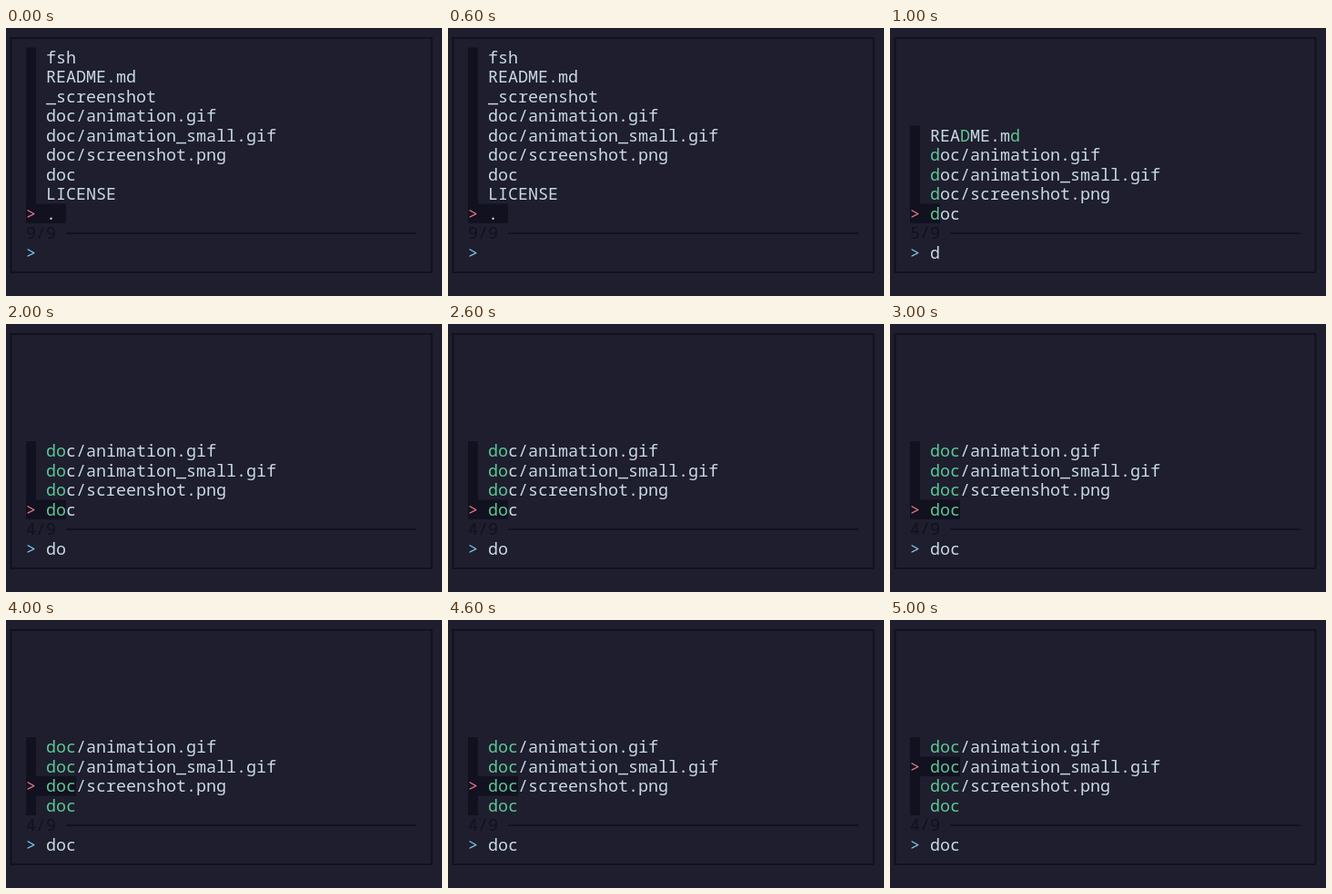
Recreate the animation shown at these times as an HTML page. Size 479 by 295 pixels, loop 6 s.

```html
<!DOCTYPE html>
<html lang="en">
<head>
<meta charset="utf-8">
<title>Fuzzy finder</title>
<style>
  html, body { margin: 0; width: 100%; height: 100%; overflow: hidden; background: #1e1e2e; }
  svg { display: block; width: 479px; height: 295px; }
  text { font: 18.333px "Noto Sans Mono", monospace; fill: #c9d9e3; white-space: pre; }
  .dark { fill: #121120; }
  .match { fill: #5cc794; }
  .pointer { fill: #e8798a; }
  .prompt { fill: #82c6ea; }
  .line { fill: none; stroke: #121120; stroke-width: 2; }
</style>
</head>
<body>
<svg id="stage" viewBox="0 0 479 295"></svg>
<script>
const CELL = 11, ROW = 21.5, BASELINE = 17, LAST_ROW = 9, STEP = 1000;
const stage = document.getElementById('stage');

const docs = ['doc/animation.gif', 'doc/animation_small.gif', 'doc/screenshot.png', 'doc'];
const all = ['fsh', 'README.md', '_screenshot', ...docs, 'LICENSE', '.'];

// "up" counts rows from the bottom of the list to the selected one.
const scenes = [
  { query: '', items: all, up: 0 },
  { query: 'd', items: ['README.md', ...docs], up: 0 },
  { query: 'do', items: docs, up: 0 },
  { query: 'doc', items: docs, up: 0 },
  { query: 'doc', items: docs, up: 1 },
  { query: 'doc', items: docs, up: 2 },
];

function add(parent, tag, attrs, content = '') {
  const el = document.createElementNS('http://www.w3.org/2000/svg', tag);
  for (const key in attrs) el.setAttribute(key, attrs[key]);
  el.textContent = content;
  return parent.appendChild(el);
}

const block = (parent, col, row, cols, rows) => add(parent, 'rect', {
  class: 'dark', x: col * CELL, y: row * ROW, width: cols * CELL, height: rows * ROW,
});

const write = (parent, col, row, content, cls = '') => add(parent, 'text', {
  class: cls, x: col * CELL, y: row * ROW + BASELINE,
}, content);

function writeItem(parent, row, name, query) {
  const label = write(parent, 4, row, '');
  const isMatch = (ch, i) => name.startsWith('doc')
    ? i < query.length
    : query !== '' && ch.toLowerCase() === query;
  [...name].forEach((ch, i) => add(label, 'tspan', isMatch(ch, i) ? { class: 'match' } : {}, ch));
}

function drawScene({ query, items, up }) {
  const group = add(stage, 'g', {});
  const top = LAST_ROW - items.length + 1;
  const selected = LAST_ROW - up;
  block(group, 2, top, 1, items.length);
  block(group, 2, selected, 2 + (query.length || 2), 1);
  items.forEach((name, i) => writeItem(group, top + i, name, query));
  write(group, 2, selected, '>', 'pointer');
  write(group, 2, LAST_ROW + 1, `${items.length}/${all.length}`, 'dark');
  write(group, 4, LAST_ROW + 2, query);
  return group;
}

add(stage, 'rect', { class: 'line', x: 5.5, y: 11, width: 462, height: 258 });
add(stage, 'path', { class: 'line', d: 'M66 226H451' });
write(stage, 2, LAST_ROW + 2, '>', 'prompt');

scenes.map(drawScene).forEach((group, i) => {
  const frames = [...scenes, scenes[0]].map((scene, k) => ({
    opacity: k === i ? 1 : 0, easing: 'steps(1, end)',
  }));
  group.animate(frames, { duration: STEP * scenes.length, iterations: Infinity });
});
</script>
</body>
</html>
```
